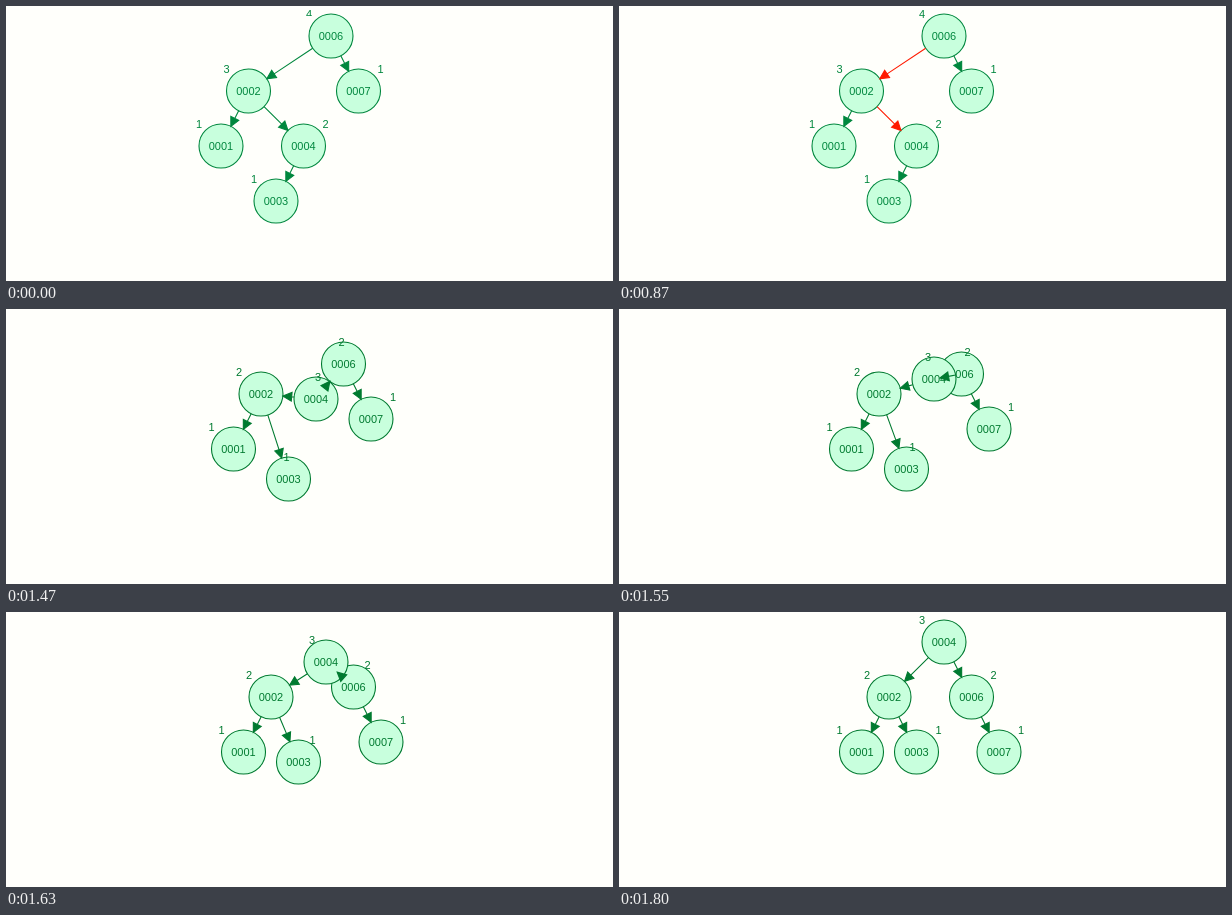
These frames come from a looping animation (607x275 px, 1.87 s). An HTML page:

```html
<!DOCTYPE html>
<html lang="en">
<head>
<meta charset="utf-8">
<title>Tree rotation</title>
<style>
html, body { margin: 0; width: 100%; height: 100%; overflow: hidden; background: #fffffb; }
svg { display: block; width: 607px; height: 275px; }
text { font: 11px Arial, "Liberation Sans", sans-serif; text-anchor: middle; fill: var(--ink); }
circle { fill: #c8ffdd; stroke: var(--ink); stroke-width: 1.1; }
.edge { stroke-width: 1.1; stroke-miterlimit: 10; }
</style>
</head>
<body>
<svg id="stage" viewBox="0 0 607 275">
  <clipPath id="top"><rect x="298" y="0" width="12" height="10"/></clipPath>
  <g id="nodes"></g>
  <g id="labels"></g>
  <g id="edges"></g>
</svg>
<script>
const LOOP = 1870, TURN = 1400, RED_AT = 70;
const R = 22, HEAD = 8.8, HALF = 4.4;
const RED = '#ff1a00';

// Grid cells (column, row), label side and height, before and after the rotation
const nodes = [
  { key: 6, a: [4, 0, -1, 4], b: [5, 1, 1, 2] },
  { key: 2, a: [1, 1, -1, 3], b: [2, 1, -1, 2] },
  { key: 7, a: [5, 1, 1, 1], b: [6, 2, 1, 1] },
  { key: 1, a: [0, 2, -1, 1], b: [1, 2, -1, 1] },
  { key: 3, a: [2, 3, -1, 1], b: [3, 2, 1, 1] },
  { key: 4, a: [3, 2, 1, 2], b: [4, 0, -1, 3] }
];
const before = [[6, 2], [6, 7], [2, 1], [2, 4], [4, 3]];
const after = [[4, 2], [4, 6], [6, 7], [2, 1], [2, 3]];
const path = ['6-2', '2-4'];

// The move is made of eleven ticks, shown in five jumps
const jumps = [[1400, 2], [1470, 5], [1550, 7], [1630, 9], [1700, 11]];

const stage = document.getElementById('stage');
const byKey = {};

function add(parent, tag, cls) {
  const el = document.createElementNS('http://www.w3.org/2000/svg', tag);
  if (cls) el.setAttribute('class', cls);
  document.getElementById(parent).appendChild(el);
  return el;
}

function set(el, attrs) {
  for (const k in attrs) el.setAttribute(k, attrs[k]);
}

const mix = (a, b, p) => a + (b - a) * p;

for (const n of nodes) {
  byKey[n.key] = n;
  n.disc = add('nodes', 'circle');
  n.disc.setAttribute('r', R);
  n.name = add('nodes', 'text');
  n.name.textContent = String(n.key).padStart(4, '0');
  n.label = add('labels', 'text');
}
const lines = before.map(() => add('edges', 'path', 'edge'));

function arrow(from, to) {
  const dx = to.x - from.x, dy = to.y - from.y, d = Math.hypot(dx, dy);
  const ux = dx / d, uy = dy / d;
  const sx = from.x + ux * R, sy = from.y + uy * R;
  const tx = to.x - ux * R, ty = to.y - uy * R;
  // Overlapping discs turn the arrow round
  const s = d < 2 * R ? -1 : 1;
  const bx = tx - s * ux * HEAD, by = ty - s * uy * HEAD;
  const wx = uy * HALF, wy = ux * HALF;
  return `M${sx} ${sy}L${bx} ${by}M${tx} ${ty}L${bx - wx} ${by + wy}L${bx + wx} ${by - wy}Z`;
}

function draw(t) {
  const turned = t >= TURN;
  const ink = turned ? '#007a30' : '#00873e';
  let p = 0;
  for (const [at, tick] of jumps) if (t >= at) p = tick / 11;
  stage.style.setProperty('--ink', ink);

  for (const n of nodes) {
    n.x = 215 + 27.5 * mix(n.a[0], n.b[0], p);
    n.y = 30 + 55 * mix(n.a[1], n.b[1], p);
    set(n.disc, { cx: n.x, cy: n.y });
    set(n.name, { x: n.x, y: n.y + 4 });
    set(n.label, { x: n.x + R * mix(n.a[2], n.b[2], p), y: n.y - 18 });
    n.label.textContent = (turned ? n.b : n.a)[3];
  }
  byKey[6].label.setAttribute('clip-path', t < RED_AT ? 'url(#top)' : 'none');

  (turned ? after : before).forEach(([i, j], k) => {
    const lit = !turned && t >= RED_AT && path.includes(i + '-' + j);
    const color = lit ? RED : ink;
    set(lines[k], { d: arrow(byKey[i], byKey[j]), stroke: color, fill: color });
  });
}

function loop() {
  draw(performance.now() % LOOP);
  requestAnimationFrame(loop);
}
loop();
</script>
</body>
</html>
```
